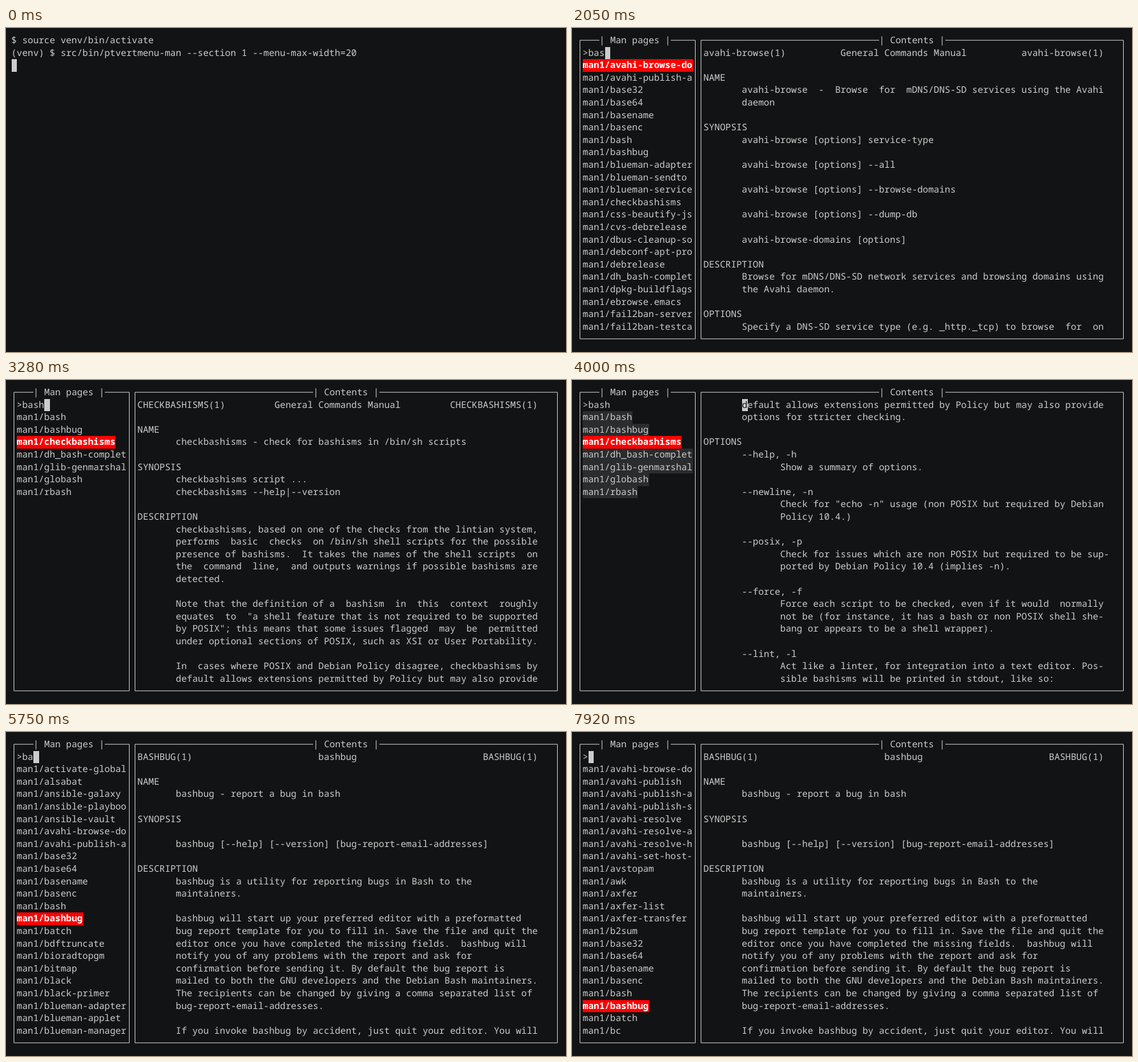
Recreate the animation shown at these times as an HTML page. Size 879x510 px, loop 8000 ms.

```html
<!DOCTYPE html>
<html lang="en">
<meta charset="utf-8">
<title>Man page menu</title>
<style>
html, body { margin: 0; height: 100%; overflow: hidden; background: #121314; }
svg { display: block; width: 879px; height: 510px; }
text { font: 14.359px "Noto Sans Mono", "DejaVu Sans Mono", monospace; fill: #ccc; white-space: pre; text-rendering: geometricPrecision; }
.sel { font-weight: bold; fill: #fff; }
.inv { fill: #121314; }
path { stroke: #ccc; fill: none; }
</style>
<svg id="screen" viewBox="0 0 879 510"></svg>
<script>
const CW = 8.6154, RH = 19.6, ROWS = 23, LOOP = 8000;
const FG = '#ccc', RED = '#f00', DIM = '#2b2c2d';
const words = s => s.split(' ');

// Menu entries, per filter
const bas = words('base32 base64 basename basenc bash bashbug');
const start = words('411toppm 7z 7za 7zr CA.pl GET HEAD ImageMagick-im6 Mail POST Xephyr Xmark Xorg Xorg.wrap Xserver Xvfb [ a2x aa-enabled aa-exec aa-features-abi aclocal');
const late = [...words('autoupdate avahi-browse avahi-browse-domains avahi-publish avahi-publish-address avahi-publish-service avahi-resolve avahi-resolve-address avahi-resolve-host-name avahi-set-host-name avstopam awk axfer axfer-list axfer-transfer b2sum'), ...bas, 'batch', 'bc'];
const menuB = [...words('Xvfb aa-enabled aa-features-abi activate-global alsabat ansible ansible-config ansible-connection ansible-console ansible-doc ansible-galaxy ansible-inventory ansible-playbook ansible-pull ansible-test ansible-vault atktopbm avahi-browse avahi-browse-domains avahi-publish avahi-publish-address avahi-publish-service b2sum'), ...bas];
const menuBa = [...words('activate-global alsabat ansible-galaxy ansible-playbook ansible-vault avahi-browse-domains avahi-publish-address'), ...bas, ...words('batch bdftruncate bioradtopgm bitmap black black-primer blueman-adapters blueman-applet blueman-manager')];
const menuBas = [...words('avahi-browse-domains avahi-publish-address'), ...bas, ...words('blueman-adapters blueman-sendto blueman-services checkbashisms css-beautify-js cvs-debrelease dbus-cleanup-sockets debconf-apt-progress debrelease dh_bash-completion dpkg-buildflags ebrowse.emacs fail2ban-server fail2ban-testcases')];
const menuBash = words('bash bashbug checkbashisms dh_bash-completion glib-genmarshal globash rbash');

function man(title, body, mid = 'General Commands Manual') {
  const left = title.padEnd((73 - mid.length) >> 1) + mid;
  return (left + title.padStart(73 - left.length) + '\n' + body).split('\n');
}

const zip = (name, tail) => man(name + '(1)', `
NAME
       ${name} - A file archiver with high compression ratio format

SYNOPSIS
       ${name}  <command>  [<switches>... ] <archive_name> [<file_names>... ]
       [<@listfiles>... ]

DESCRIPTION
       7-Zip is a file archiver supporting 7z (that implements LZMA  com-
       pression  algorithm featuring very high compression ratio), LZMA2,
       XZ, ZIP, Zip64, CAB, RAR (if the non-free p7zip-rar package is in-
       stalled), ARJ, GZIP, BZIP2, TAR, CPIO, RPM, ISO,  most  filesystem
       images and DEB formats.  Compression ratio in the new 7z format is
       30-50% better than ratio in ZIP format.

${tail}

COMMANDS
       a      Add files to archive
`);

const pages = {
none: [],
toppm: man('411toppm(1)', `
NAME
       411toppm - convert a camera .411 image to PPM

SYNOPSIS
       411toppm [-width width] [-height height] [411file]

       All  options  can be abbreviated to their shortest unique prefix.

DESCRIPTION
       This program is part of Netpbm.

       411toppm reads a .411 file, such as from a digital camera, and con-
       verts it to a PPM image as output.

       Output is to Standard Output.

       The originator of this format keeps small thumbnails in such files
       next to the full images on the disk.

OPTIONS
       -width The width (number of columns) of the input image.
              Default is 64.`, 'Netpbm User Manual'),
z: zip('7z', `       7z uses plugins to handle archives.  7za is a stand-alone executa-
       ble that handles fewer archive formats than 7z.`),
za: zip('7za', `       7za  is  a stand-alone executable.  7za handles fewer archive for-
       mats than 7z(1).`),
xvfb: man('XVFB(1)', `
NAME
       Xvfb - virtual framebuffer X server for X Version 11

SYNOPSIS
       Xvfb [option] ...

DESCRIPTION
       Xvfb  is  an X server that can run on machines with no display
       hardware and no physical input devices.  It emulates a dumb frame-
       buffer using virtual memory.

       The primary use of this server was intended to be server testing.
       The fb code for any depth can be exercised with this server with-
       out the need for real hardware that supports the desired depths.

OPTIONS
       In addition to the normal server options described in the  Xserv-
       er(1) manual page, Xvfb accepts the following command line switch-
       es:

       -screen screennum WxHxD`),
activate: man('ACTIVATE-GLOBAL(1)', `
NAME
       activate-global-python-argcomplete - activate global completion

SYNOPSIS
       activate-global-python-argcomplete [-h] [--dest DEST] [--user]

DESCRIPTION
       Activate  the generic bash-completion script for the  argcomplete
       module.

OPTIONS
       -h, --help
              show this help message and exit

       --dest DEST
              Specify the directory to install into

       --user Install into user directory

SEE ALSO
       The generic script is read by bash for each program that is marked`, 'User Commands'),
avahi: man('avahi-browse(1)', `
NAME
       avahi-browse  -  Browse  for  mDNS/DNS-SD services using the Avahi
       daemon

SYNOPSIS
       avahi-browse [options] service-type

       avahi-browse [options] --all

       avahi-browse [options] --browse-domains

       avahi-browse [options] --dump-db

       avahi-browse-domains [options]

DESCRIPTION
       Browse for mDNS/DNS-SD network services and browsing domains using
       the Avahi daemon.

OPTIONS
       Specify a DNS-SD service type (e.g. _http._tcp) to browse  for  on`),
bash: man('BASH(1)', `
NAME
       bash - GNU Bourne-Again SHell

SYNOPSIS
       bash [options] [command_string | file]

COPYRIGHT
       Bash is Copyright (C) 1989-2020 by its authors.

DESCRIPTION
       Bash  is  an sh-compatible command language interpreter that exe-
       cutes commands read from the standard input or from a file.  Bash
       also incorporates useful features from the Korn and C shells  (ksh
       and csh).

       Bash  is  intended  to be a conformant implementation of the Shell
       and Utilities portion of the IEEE POSIX specification (IEEE  Stan-
       dard  1003.1).   Bash  can  be configured to be POSIX-conformant by
       default.

OPTIONS
       All of the single-character shell options documented in  the  de-`),
bashbug: man('BASHBUG(1)', `
NAME
       bashbug - report a bug in bash

SYNOPSIS

       bashbug [--help] [--version] [bug-report-email-addresses]

DESCRIPTION
       bashbug is a utility for reporting bugs in Bash to the
       maintainers.

       bashbug will start up your preferred editor with a preformatted
       bug report template for you to fill in. Save the file and quit the
       editor once you have completed the missing fields.  bashbug will
       notify you of any problems with the report and ask for
       confirmation before sending it. By default the bug report is
       mailed to both the GNU developers and the Debian Bash maintainers.
       The recipients can be changed by giving a comma separated list of
       bug-report-email-addresses.

       If you invoke bashbug by accident, just quit your editor. You will`, 'bashbug'),
check: man('CHECKBASHISMS(1)', `
NAME
       checkbashisms - check for bashisms in /bin/sh scripts

SYNOPSIS
       checkbashisms script ...
       checkbashisms --help|--version

DESCRIPTION
       checkbashisms, based on one of the checks from the lintian system,
       performs  basic  checks  on /bin/sh shell scripts for the possible
       presence of bashisms.  It takes the names of the shell scripts  on
       the  command  line,  and outputs warnings if possible bashisms are
       detected.

       Note that the definition of a  bashism  in  this  context  roughly
       equates  to  "a shell feature that is not required to be supported
       by POSIX"; this means that some issues flagged  may  be  permitted
       under optional sections of POSIX, such as XSI or User Portability.

       In  cases where POSIX and Debian Policy disagree, checkbashisms by
       default allows extensions permitted by Policy but may also provide
       options for stricter checking.

OPTIONS
       --help, -h
              Show a summary of options.

       --newline, -n
              Check for "echo -n" usage (non POSIX but required by Debian
              Policy 10.4.)

       --posix, -p
              Check for issues which are non POSIX but required to be sup-
              ported by Debian Policy 10.4 (implies -n).

       --force, -f
              Force each script to be checked, even if it would  normally
              not be (for instance, it has a bash or non POSIX shell she-
              bang or appears to be a shell wrapper).

       --lint, -l
              Act like a linter, for integration into a text editor. Pos-
              sible bashisms will be printed in stdout, like so:

              {filename}:{lineno}:1: warning: possible bashism; {explana-
              tion}

       --extra, -x
              Highlight lines which, whilst they do not contain bashisms,
              may be useful in determining whether a particular issue  is
              a  false  positive  which may be ignored.  For example, the
              use of "$BASH_ENV" may  be  preceded  by  checking  whether
              "$BASH" is set.

       --early-fail, -e
              Exit right after a first error is seen.

       --version, -v
              Show version and copyright information.

EXIT VALUES
       The exit value will be 0 if no possible bashisms or other problems
       were  detected.  Otherwise it will be the sum of the following er-
       ror values:
`),
batch: man('AT(1)', `
NAME
       at,  batch,  atq, atrm - queue, examine, or delete jobs for  later
       execution

SYNOPSIS
       at [-V] [-q queue] [-f file] [-mMlv] timespec ...
       at -c job [job ...]
       atq [-V] [-q queue]
       atrm [-V] job [job ...]
       batch
       at -b

DESCRIPTION
       at  and  batch  read  commands from standard input or a specified
       file which are to be executed at a later time, using /bin/sh.

       at      executes commands at a specified time.

       atq     lists the user's pending jobs.

       atrm    deletes jobs, identified by their job number.`),
bc: man('bc(1)', `
NAME
       bc - An arbitrary precision calculator language

SYNTAX
       bc [ -hlwsqv ] [long-options] [  file ... ]

DESCRIPTION
       bc is a language that supports arbitrary  precision  numbers  with
       interactive execution of statements.  There are some similarities
       in the syntax to the C programming language.  A standard math  li-
       brary  is available by command line option.  If requested, the math
       library is defined before processing any files.  bc starts by pro-
       cessing code from all the files listed on the command line in  the
       order listed.

OPTIONS
       -h, --help
              Print the usage and exit.

       -i, --interactive
              Force interactive mode.`)
};

// time, query, menu, first entry shown, selected entry, page, page scroll, page has the focus
const steps = [
  [170, '', start, 0, 0, 'none'],
  [200, '', start, 0, 0, 'toppm'],
  [550, '', start, 0, 1, 'z'],
  [920, '', start, 0, 2, 'za'],
  [1300, 'b', menuB, 0, 0, 'xvfb'],
  [1670, 'ba', menuBa, 0, 0, 'activate'],
  [2050, 'bas', menuBas, 0, 0, 'avahi'],
  [2420, 'bash', menuBash, 0, 0, 'none'],
  [2570, 'bash', menuBash, 0, 0, 'bash'],
  [2910, 'bash', menuBash, 0, 1, 'bashbug'],
  [3280, 'bash', menuBash, 0, 2, 'check'],
  [3650, 'bash', menuBash, 0, 2, 'check', 0, true],
  [4000, 'bash', menuBash, 0, 2, 'check', 22, true],
  [4340, 'bash', menuBash, 0, 2, 'check', 44, true],
  [4690, 'bash', menuBash, 0, 2, 'check', 44],
  [5030, 'bash', menuBash, 0, 1, 'bashbug'],
  [5410, 'bas', menuBas, 0, 7, 'bashbug'],
  [5750, 'ba', menuBa, 0, 12, 'bashbug'],
  [6100, 'b', menuB, 7, 28, 'bashbug'],
  [6450, '', late, 0, 21, 'bashbug'],
  [6790, '', late, 1, 22, 'batch'],
  [7160, '', late, 2, 23, 'none'],
  [7200, '', late, 2, 23, 'bc'],
  [7540, '', late, 2, 22, 'batch'],
  [7920, '', late, 2, 21, 'bashbug']
];

const esc = s => s.replace(/&/g, '&amp;').replace(/</g, '&lt;');
const midY = row => Math.floor(19.5 + RH * row);
const edgeX = col => Math.round((col + 1) * CW);
const edgeY = row => Math.round(10 + RH * row);

const text = (col, row, s, cls = '') =>
  s.trim() && `<text class="${cls}" x="${(col + 1) * CW - 0.4}" y="${midY(row) + 5}">${esc(s)}</text>`;

const cells = (col, row, n, fill) =>
  `<rect x="${edgeX(col)}" y="${edgeY(row)}" width="${edgeX(col + n) - edgeX(col)}" height="${edgeY(row + 1) - edgeY(row)}" fill="${fill}"/>`;

const cursor = (col, row, ch = ' ') => cells(col, row, 1, FG) + text(col, row, ch, 'inv');

// A titled frame, open on top where the title stands
function panel(left, right, pipe, title) {
  const x = col => Math.floor((col + 1.5) * CW) + 0.5;
  const top = midY(0) + 0.25, bottom = midY(ROWS + 1) + 0.25;
  const end = pipe + title.length + 4;
  return `<path d="M${edgeX(pipe)} ${top}H${x(left)}V${bottom}H${x(right)}V${top}H${edgeX(end)}"/>` +
    text(pipe, 0, `| ${title} |`);
}

const frame = panel(0, 21, 4, 'Man pages') + panel(22, 99, 55, 'Contents');
const shell = text(0, 0, '$ source venv/bin/activate') +
  text(0, 1, '(venv) $ src/bin/ptvertmenu-man --section 1 --menu-max-width=20') + cursor(0, 2);

function view([, query, menu, first, chosen, page, scroll = 0, reading = false]) {
  let out = frame + text(1, 1, '>' + query);
  menu.slice(first, first + 22).forEach((name, i) => {
    const label = ('man1/' + name).slice(0, 20), on = first + i === chosen;
    if (on || reading) out += cells(1, i + 2, label.length, on ? RED : DIM);
    out += text(1, i + 2, label, on ? 'sel' : '');
  });
  const lines = pages[page].slice(scroll, scroll + ROWS);
  lines.forEach((line, i) => out += text(23, i + 1, line));
  if (!reading) return out + cursor(query.length + 2, 1);
  const indent = lines[0].search(/\S/);
  return out + cursor(23 + indent, 1, lines[0][indent]);
}

const screen = document.getElementById('screen');
let shown;
function draw() {
  const t = performance.now() % LOOP;
  const step = steps.filter(s => s[0] <= t).pop() || null;
  if (step !== shown) {
    screen.innerHTML = step ? view(step) : shell;
    shown = step;
  }
  requestAnimationFrame(draw);
}
draw();
</script>
</html>
```
